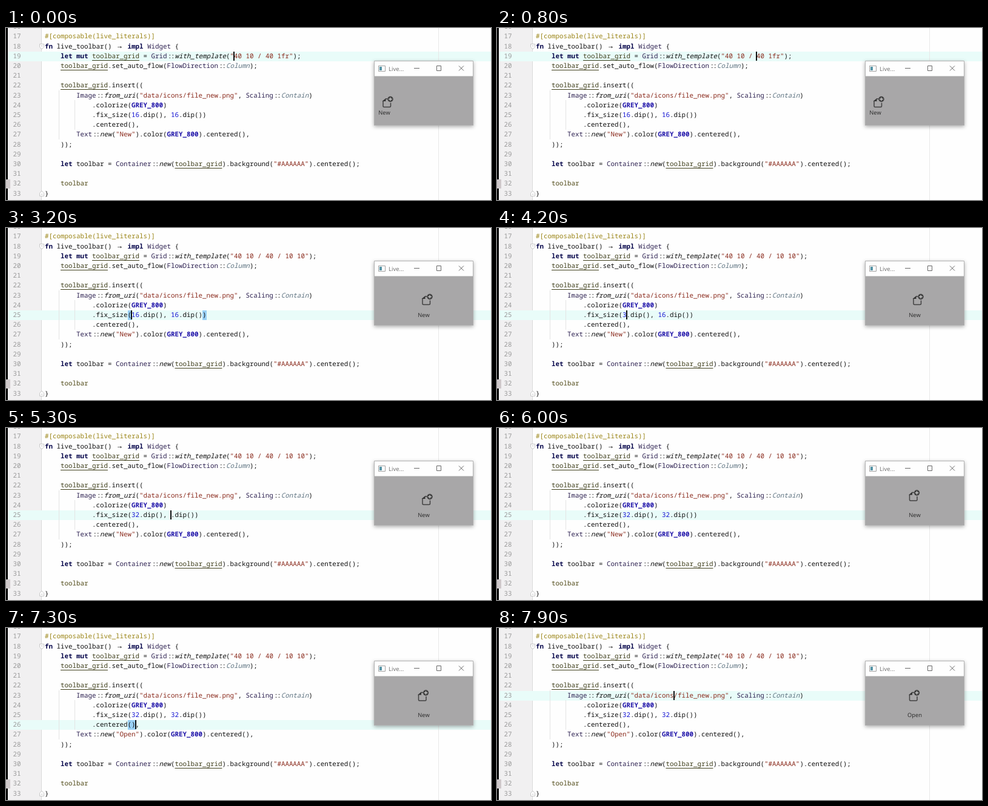
These frames come from a looping animation (800x284 px, 8 s). An HTML page:

```html
<!DOCTYPE html>
<html lang="en">
<head>
<meta charset="utf-8">
<title>Live toolbar editing</title>
<style>
html, body { margin: 0; width: 100%; height: 100%; overflow: hidden; background: #fefefe; }
#stage { position: relative; width: 800px; height: 284px; overflow: hidden; background: #fefefe; }
#stage div { position: absolute; }
#gutter { left: 3px; top: 0; width: 55px; height: 284px; background: #f1f0f1; border-right: 1px solid #dadada; }
#edge { left: 0; top: 0; width: 3px; height: 284px; background: #000; }
#mark { left: 0; top: 250px; width: 7px; height: 15px; background: #cfc8ca; }
#current { left: 4px; width: 796px; height: 16px; background: #e9fcf9; }
#margin { left: 713px; top: 0; width: 1px; height: 284px; background: #e8e8e8; }
.guide { width: 1px; background: #e4e4e4; }
.bracket { width: 6.5px; height: 16px; background: #99d0f5; }
#caret { width: 2px; height: 15px; background: #111; }
.row, .number {
  height: 16.2px; line-height: 16.2px; white-space: pre; color: #101010;
  font-family: "Noto Sans Mono", monospace; font-size: 10.833px; font-weight: 500;
  text-rendering: geometricPrecision; font-variant-ligatures: none;
}
.row { left: 64px; }
.number { left: 11.5px; color: #9a9a9a; font-weight: 400; }
.attr { color: #9a8415; }
.string { color: #8a2a1c; }
.key { color: #08084c; font-weight: bold; }
.const { color: #1c10a8; font-weight: bold; }
.grid { color: #3f3f1c; text-decoration: underline; text-underline-offset: 2.5px; text-decoration-skip-ink: none; }
.method { font-style: italic; }
.variant { color: #5f7482; font-style: italic; }
.type { color: #2c2050; }
.num { color: #1414d2; }
.result { color: #504a18; }
.path { letter-spacing: -1.5px; padding: 0 1.5px; }
.arrow { display: inline-block; width: 13px; text-align: center; font-size: 14px; line-height: 0; }
svg { position: absolute; left: 0; top: 0; }
svg text { font-family: "Noto Sans", sans-serif; text-rendering: geometricPrecision; }
#window { filter: drop-shadow(0 2px 3px #0005); }
</style>
</head>
<body>
<div id="stage">
  <div id="gutter"></div>
  <div id="current"></div>
  <div id="edge"></div>
  <div id="mark"></div>
  <div id="margin"></div>
  <div class="guide" style="left:87px;top:103px;height:81px"></div>
  <div class="guide" style="left:113px;top:119px;height:49px"></div>
  <div class="bracket"></div>
  <div class="bracket"></div>
  <div id="code"></div>
  <div id="caret"></div>
  <svg width="800" height="284" fill="none">
    <g fill="#fff" stroke="#c8c8c8">
      <path d="M55.500 26.500h7v5l-3.500 3.500-3.500-3.500z"/>
      <path d="M55.500 277.500h7v-5l-3.500-3.500-3.500 3.500z"/>
      <path d="M57.500 29.500h3M57.500 274.500h3"/>
    </g>
    <g id="window">
      <path fill="#a8a7a8" d="M607 54.500h164v106.500h-164z"/>
      <path fill="#fefefe" d="M607 54.500h164v25h-164z"/>
      <path stroke="#b0b0b0" d="M607.500 54.500h163v106h-163z"/>
    </g>
    <path fill="#fff" stroke="#a0a0a0" d="M614.500 62.500h11v9h-11z"/>
    <path fill="#5593a5" d="M616 64h4v6h-4z"/>
    <text x="631" y="70.500" font-size="9.500" fill="#777">Live...</text>
    <path stroke="#666" d="M673 66.500h9M710.500 62.500h7v8h-7zM747 62.500l8 8M755 62.500l-8 8"/>
    <g id="icon">
      <path stroke="#414141" stroke-width="1.500" d="M2 8V16.500q0 1.500 1.500 1.500H13q1.500 0 1.500-1.500V11M6 4.500h3.500"/>
      <path fill="#333" d="M0.500 8.500L6.500 3.500V8.500z"/>
      <circle cx="14" cy="5" r="4.700" fill="#414141"/>
      <path stroke="#c8c8c8" stroke-width="1.300" d="M11.200 5h5.600M14 2.200v5.600"/>
    </g>
    <text id="label" text-anchor="middle" fill="#303030" font-size="9.300" font-weight="500"></text>
  </svg>
</div>
<script>
const LOOP = 8000, CELL = 6.5, LEFT = 64, ROW = 16.2, FIRST = 17, BLINK = 500;
const $ = id => document.getElementById(id);
const rowTop = line => 6.3 + (line - FIRST) * ROW;

const source = s => [
  '#[composable(live_literals)]',
  'fn live_toolbar() -> impl Widget {',
  `    let mut toolbar_grid = Grid::with_template("${s.grid}");`,
  '    toolbar_grid.set_auto_flow(FlowDirection::Column);',
  '',
  '    toolbar_grid.insert((',
  '        Image::from_uri("data/icons/file_new.png", Scaling::Contain)',
  '            .colorize(GREY_800)',
  `            .fix_size(${s.width}.dip(), ${s.height}.dip())`,
  '            .centered(),',
  `        Text::new("${s.text}").color(GREY_800).centered(),`,
  '    ));',
  '',
  '    let toolbar = Container::new(toolbar_grid).background("#AAAAAA").centered();',
  '',
  '    toolbar',
  '}'
];

// Each step changes part of the state; an edit or caret move restarts the blink.
const steps = [
  [0, { line: 19, col: 48, grid: '40 10 / 40 1fr', width: '16', height: '16', text: 'New',
        icon: [620, 112.5], label: [624, 142.5], shown: 'New' }],
  [400, { col: 51 }],
  [600, { col: 54 }],
  [800, { col: 56 }],
  [1000, { col: 59 }],
  [1200, { grid: '40 10 / 40 fr' }],
  [1300, { grid: '40 10 / 40 r' }],
  [1400, { grid: '40 10 / 40 ' }],
  [1500, { grid: '40 10 / 40 /', col: 60, icon: [685, 112.5], label: [689, 142.5] }],
  [1600, { grid: '40 10 / 40 / ', col: 61 }],
  ...[...'10 10'].map((c, i) => [2100 + i * 100,
    { grid: '40 10 / 40 / ' + '10 10'.slice(0, i + 1), col: 62 + i }]),
  [2600, { icon: [685, 108.5], label: [689, 146.5] }],
  [3100, { line: 25, col: 22 }],
  [3900, { width: '6' }],
  [4000, { width: '' }],
  [4200, { width: '3', col: 23 }],
  [4500, { width: '32', col: 24 }],
  [4700, { col: 28 }],
  [4900, { col: 32 }],
  [5200, { height: '6' }],
  [5300, { height: '' }],
  [5400, { height: '3', col: 33 }],
  [5500, { height: '32', col: 34 }],
  [6000, { icon: [678.5, 102] }],
  [6200, { line: 27, col: 19 }],
  [6300, { text: 'ew' }],
  [6400, { text: 'w' }],
  [6500, { text: '' }],
  ...[...'Open'].map((c, i) => [6800 + i * 100, { text: 'Open'.slice(0, i + 1), col: 20 + i }]),
  [7300, { line: 26 }],
  [7400, { line: 25 }],
  [7500, { line: 24 }],
  [7600, { line: 23, shown: 'Open' }],
  [7700, { col: 25 }],
  [7800, { col: 29 }],
  [7900, { col: 35 }]
];

const tokens = new RegExp([
  '(?<attr>^#.*)', '(?<string>"[^"]*")', '(?<key>\\b(?:fn|let|mut|impl)\\b)',
  '(?<const>[A-Z]+_\\d+)', '(?<grid>toolbar_grid)', '(?<path>::)',
  '(?<method>(?<=::)[a-z_]+)', '(?<variant>(?<=::)[A-Z]\\w+)',
  '(?<type>[A-Z]\\w+)', '(?<num>\\b\\d+)', '(?<result>(?<=^ +)toolbar$)', '(?<arrow>->)'
].join('|'), 'g');

const paint = text => text.replace(tokens, (...args) => {
  const kind = Object.entries(args.at(-1)).find(([, value]) => value)[0];
  return `<span class="${kind}">${kind === 'arrow' ? '→' : args[0]}</span>`;
});

function matchBrackets(text, col) {
  const at = [col - 1, col].find(i => '()'.includes(text[i] || '?'));
  if (at === undefined) return [];
  const dir = text[at] === '(' ? 1 : -1;
  for (let i = at, depth = 0; i >= 0 && i < text.length; i += dir) {
    if (text[i] === '(') depth++;
    if (text[i] === ')') depth--;
    if (depth === 0) return [at, i];
  }
  return [];
}

function addRow(className, line, text = '') {
  const row = document.createElement('div');
  row.className = className;
  row.style.top = rowTop(line) + 'px';
  row.textContent = text;
  $('code').append(row);
  return row;
}

for (let n = FIRST - 1; n <= 33; n++) addRow('number', n, n);
const rows = source({}).map((_, i) => addRow('row', FIRST + i));
const brackets = document.querySelectorAll('.bracket');
const drawn = [];

function place(el, line, col, dx = 0) {
  el.style.left = LEFT + col * CELL + dx + 'px';
  el.style.top = rowTop(line) + 'px';
}

function render(t) {
  const state = {};
  let touched = 0;
  for (const [time, change] of steps) {
    if (time > t) break;
    Object.assign(state, change);
    if (!change.icon || 'col' in change) touched = time;
  }
  const lines = source(state);
  lines.forEach((text, i) => {
    if (drawn[i] !== text) rows[i].innerHTML = paint(drawn[i] = text);
  });

  $('current').style.top = rowTop(state.line) + 'px';
  place($('caret'), state.line, state.col, -1);
  $('caret').style.opacity = (t - touched) % (2 * BLINK) < BLINK ? 1 : 0;

  const pair = matchBrackets(lines[state.line - FIRST], state.col);
  brackets.forEach((el, i) => {
    el.style.display = pair.length ? 'block' : 'none';
    if (pair.length) place(el, state.line, pair[i]);
  });

  const label = $('label');
  $('icon').setAttribute('transform', `translate(${state.icon})`);
  label.setAttribute('x', state.label[0]);
  label.setAttribute('y', state.label[1]);
  label.textContent = state.shown;
}

const start = performance.now();
function tick() {
  render((performance.now() - start) % LOOP);
  requestAnimationFrame(tick);
}
tick();
</script>
</body>
</html>
```
